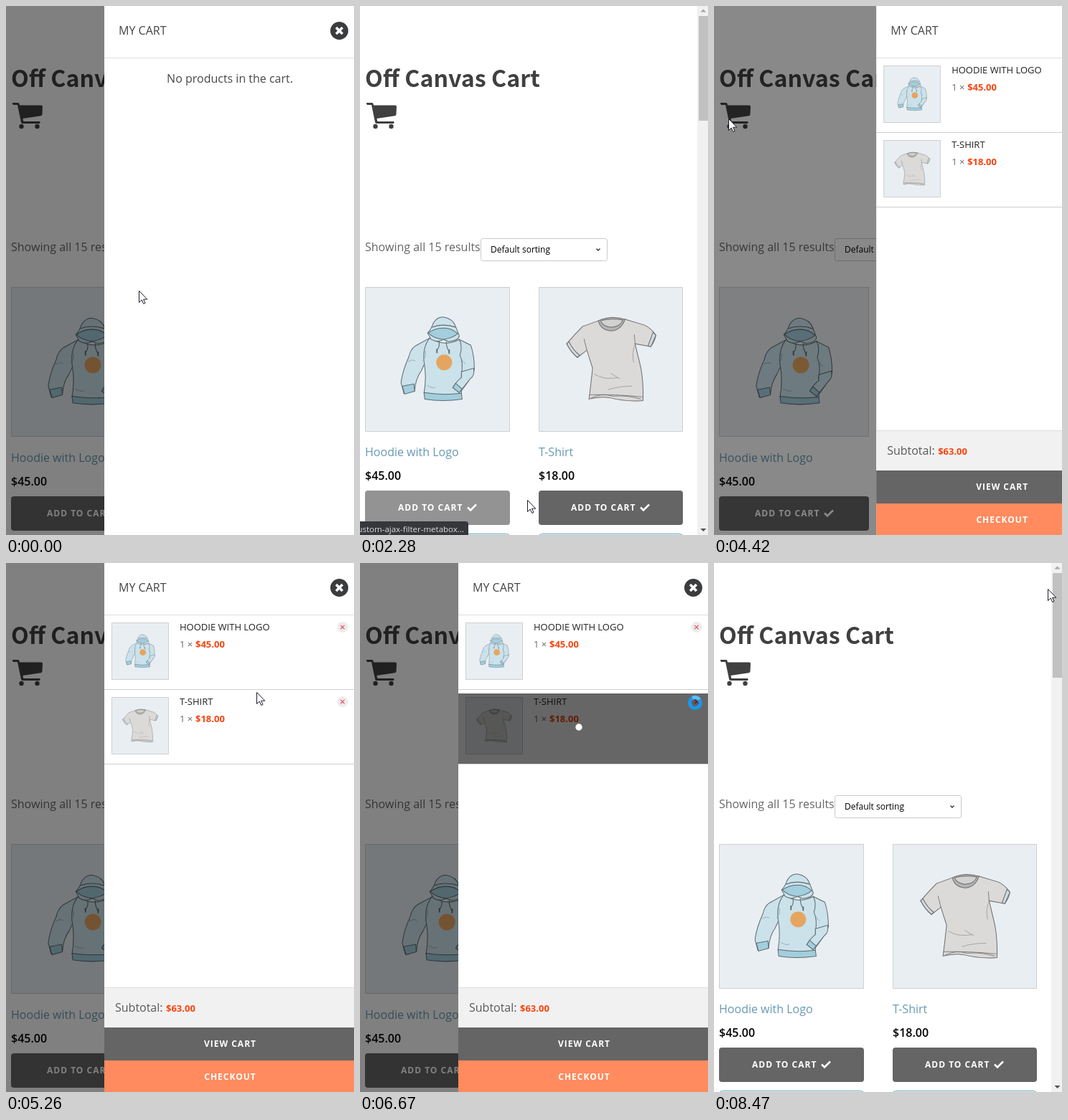
Recreate the animation shown at these times as an HTML page with a canvas. Size 485 by 738 pixels, loop 8520 ms.

```html
<!DOCTYPE html>
<html lang="en">
<head>
<meta charset="utf-8">
<title>Off Canvas Cart</title>
<style>
html, body { margin: 0; width: 100%; height: 100%; overflow: hidden; background: #fff; }
canvas { display: block; width: 485px; height: 738px; }
</style>
</head>
<body>
<canvas id="stage" width="485" height="738"></canvas>
<script>
const W = 485, H = 738, LOOP = 8520, PANEL = 348, BAR = 15, SLIDE = 450;
const ctx = document.getElementById('stage').getContext('2d');
const SANS = '"Open Sans", sans-serif';
const HEAD = '"Noto Sans CJK JP", "Noto Sans CJK SC", "Noto Sans CJK", "Open Sans", sans-serif';

// Pointer keys: time, x, y
const PATH = [
  [0, 185, 397], [50, 185, 397], [430, 82, 258], [690, 82, 258], [950, 84, 320],
  [1470, 96, 640], [1650, 108, 699], [2050, 112, 700], [2280, 232, 689], [2390, 330, 698],
  [2850, 330, 698], [3650, 65, 290], [3710, 65, 290], [4090, 20, 157], [4780, 20, 157],
  [5260, 349, 180], [5640, 467, 195], [7040, 467, 195], [7760, 468, 34], [7960, 468, 34],
  [8250, 465, 36], [LOOP, 465, 36]
];
const HAND = [[1560, 2240], [2310, 2960], [4040, 4260], [5600, 5690], [7710, 7960]];
const WAIT = [5690, 6730], STATUS = [1560, 3800];
const CLOSE1 = 650, OPEN = 4220, CLOSE2 = 7940;

const clamp = v => Math.max(0, Math.min(1, v));
const within = (t, [a, b]) => t >= a && t < b;
const ramp = (t, a, b) => clamp((t - a) / (b - a));
const pulse = (t, on, off) => Math.min(ramp(t, on, on + 120), 1 - ramp(t, off, off + 90));

// CSS "ease"
function ease(x) {
  x = clamp(x);
  let lo = 0, hi = 1, u = x;
  for (let i = 0; i < 20; i++) {
    u = (lo + hi) / 2;
    const bx = .75 * u * (1 - u) * (1 - u) + .75 * u * u * (1 - u) + u * u * u;
    if (bx < x) lo = u; else hi = u;
  }
  return .3 * u * (1 - u) * (1 - u) + 3 * u * u * (1 - u) + u * u * u;
}

// Monotone cubic through the pointer keys
function track(t, axis) {
  const slope = i => {
    const a = PATH[i], b = PATH[i + 1];
    return a && b ? (b[axis] - a[axis]) / (b[0] - a[0]) : 0;
  };
  const tangent = i => {
    const p = slope(i - 1), q = slope(i);
    return p * q > 0 ? 2 * p * q / (p + q) : 0;
  };
  let i = 0;
  while (i < PATH.length - 2 && PATH[i + 1][0] <= t) i++;
  const a = PATH[i], b = PATH[i + 1], d = b[0] - a[0], s = (t - a[0]) / d;
  const s2 = s * s, s3 = s2 * s;
  return (2 * s3 - 3 * s2 + 1) * a[axis] + (3 * s2 - 2 * s3) * b[axis] +
    d * ((s3 - 2 * s2 + s) * tangent(i) + (s3 - s2) * tangent(i + 1));
}

function box(x, y, w, h, fill) {
  ctx.fillStyle = fill;
  ctx.fillRect(x, y, w, h);
}
function round(x, y, w, h, r, fill, line) {
  ctx.beginPath();
  ctx.roundRect(x, y, w, h, r);
  if (fill) { ctx.fillStyle = fill; ctx.fill(); }
  if (line) { ctx.strokeStyle = line; ctx.lineWidth = 1; ctx.stroke(); }
}
function disc(x, y, r, fill) {
  ctx.beginPath();
  ctx.arc(x, y, r, 0, 7);
  ctx.fillStyle = fill;
  ctx.fill();
}
function shape(d, fill, line, width = 1) {
  const p = new Path2D(d);
  if (fill) { ctx.fillStyle = fill; ctx.fill(p); }
  if (line) { ctx.strokeStyle = line; ctx.lineWidth = width; ctx.stroke(p); }
}
function cross(x, y, r, color, width) {
  shape(`M${x - r} ${y - r}L${x + r} ${y + r}M${x + r} ${y - r}L${x - r} ${y + r}`, null, color, width);
}
function text(s, x, y, size, color, weight = 400, opt = {}) {
  ctx.font = `${weight} ${size}px ${opt.family || SANS}`;
  ctx.letterSpacing = (opt.space || 0) + 'px';
  ctx.textAlign = opt.align || 'left';
  ctx.fillStyle = color;
  ctx.fillText(s, x, y);
  ctx.letterSpacing = '0px';
}
function at(x, y, scale, draw) {
  ctx.save();
  ctx.translate(x, y);
  ctx.scale(scale, scale);
  draw();
  ctx.restore();
}

// Garments are drawn in a 201.5 px square
function hoodie() {
  const ink = '#5d6a70', cloth = '#cbe2eb', dark = '#a3cedd';
  shape('M90 71L70 82Q63 87 61 97Q52 117 50 133L54 148L69 145Q70 128 78 117L86 100Z', cloth, ink);
  shape('M52 138L68 135L69 145L55 149Z', dark, ink);
  shape('M131 73L147 81Q152 95 152 115Q148 127 131 148L122 140L133 121L131 100Z', cloth, ink);
  shape('M90 71Q80 83 82 104Q86 125 82 148Q108 152 134 149L134 121Q137 106 132 95Q136 82 131 73Q110 84 90 71Z', cloth, ink);
  shape('M82 147Q108 151 134 148L135 156Q108 160 83 156Z', dark, ink);
  shape('M134 118L151 113Q153 123 146 128L131 147L122 140Q128 130 134 126Z', cloth, ink);
  shape('M126 134L135 142L131 147L122 140Z', dark, ink);
  shape('M87 64Q92 59 95 50Q101 41 109 42Q122 44 126 55L131 68Q130 75 116 76L109 73Q101 78 92 73Z', cloth, ink);
  shape('M88 64Q97 57 109 57Q121 57 129 65Q122 71 109 73Q96 72 88 64Z', dark, ink);
  shape('M93 56Q108 50 126 56M103 76Q104 84 100 88M113 76Q113 84 117 90', null, ink, 1.1);
  shape('M100 86v6M117 87v6', null, ink, 1.8);
  shape('M80 103Q85 98 84 89M132 95Q134 103 140 107M60 104Q66 100 70 103M86 137Q95 142 98 139', null, '#87a2ad', .8);
  disc(110, 105, 11, '#e5a561');
}
function shirt() {
  const ink = '#6b6b6c', cloth = '#dbdad9';
  shape('M83 47L61 55Q50 66 39 79Q45 91 54 98L67 88L75 113Q73 132 70 156Q85 152 98 154Q122 160 145 158Q146 134 142 112L134 79L156 83Q162 74 163 67Q156 57 147 53L120 45Q101 42 83 47Z', cloth, ink);
  shape('M83 47Q86 60 101 61Q115 60 120 45Q101 39 83 47Z', '#b5b5b5', ink);
  shape('M86 47Q101 43 117 46Q114 55 101 56Q89 55 86 47Z', '#d2d2d0', ink);
  shape('M39 79Q45 91 54 98L57 95Q48 88 42 76ZM163 67L156 83L152 82L159 63Z', '#cfd9de', ink);
  shape('M67 88L63 72M134 79L133 66M71 150Q105 149 144 153M72 155Q88 147 103 152Q122 150 142 156', null, ink, .8);
  shape('M77 121Q91 130 111 126M100 120L113 128M96 143Q112 138 130 138M134 80Q129 92 132 105M64 76L67 87', null, '#999', .8);
}
function picture(x, y, w, h, draw) {
  round(x + .5, y + .5, w - 1, h - 1, 0, '#e9eef2', '#cdcfd0');
  at(x, y, h / 201.5, draw);
}

function card(x, col, name, price, art, load) {
  const dy = Math.round(col - 201.5);
  const left = Math.round(x), wide = Math.round(x + col) - left;
  picture(left, 392, wide, Math.round(col), art);
  text(name, left, 628 + dy, 16, '#6799b2');
  text(price, left, 661 + dy, 16, '#000', 600);
  const top = 676 + dy, label = Math.round(x + col / 2 - 55), tone = 101 + 46 * load;
  round(left, top, wide, 48, 4, `rgb(${tone},${tone},${tone})`);
  text('ADD TO CART', label, top + 28, 12, '#fff', 700, { space: 1 });
  shape(`M${label + 97} ${top + 23.5}l4 4 8-8`, null, '#fff', 2.6);
  round(left + .5, top + 60.5, wide - 1, 48, 4, '#fff', '#5f9fb4');
}

function page(t, view) {
  box(0, 0, W, H, '#fff');
  text('Off Canvas Cart', 7, 113, 32.2, '#404040', 700, { family: HEAD });
  shape('M9 135H17Q18.5 135 19 138.5H49Q51 138.5 51 140.5L50.5 151Q50.5 153 48.5 153.3L23.5 157L24.3 161H47Q48.5 162.5 47 164H23Q21.3 164 21 162L16 138H10Q8.5 136.5 9 135Z', '#404040');
  disc(21.5, 168, 3.2, '#404040');
  disc(43.5, 168, 3.2, '#404040');
  text('Showing all 15 results', 7, 342, 16, '#666');
  round(168.5, 324.5, 176, 31, 3, '#fff', '#c9c9c9');
  text('Default sorting', 182, 344, 12, '#000');
  shape('M329.5 338.5l2.5 2.5 2.5-2.5', null, '#333', 1.4);
  const col = (view - 67) / 2;
  card(7, col, 'Hoodie with Logo', '$45.00', hoodie, pulse(t, 1780, 2330));
  card(47 + col, col, 'T-Shirt', '$18.00', shirt, pulse(t, 2420, 2900));
}

function scrollbar() {
  box(W - BAR, 0, BAR, H, '#f1f1f1');
  box(W - 13, 14, 13, 146, '#c1c1c1');
  shape('M474.5 8.5l4-4 4 4z', '#a3a3a3');
  shape('M474.5 729l4 4 4-4z', '#505050');
}

function item(y, name, price, art) {
  picture(147, y + 11, 80, 80, art);
  text(name, 242, y + 22, 13, '#222');
  text('1 ×', 242, y + 46, 13, '#666');
  text(price, 264, y + 46, 13, '#f9440f', 700);
  disc(469, y + 17.5, 7.5, '#ececec');
  cross(469, y + 17.5, 2.7, '#f5455c', 1.2);
  box(137, y + 104, PANEL, 1, '#cfcfcf');
}

function panel(t, x, filled) {
  ctx.save();
  ctx.translate(x - 137, 0);
  box(137, 0, PANEL, H, '#fff');
  text('MY CART', 157, 40, 16, '#444');
  disc(464.5, 34.5, 12.5, '#3a3c3e');
  cross(464.5, 34.5, 4.4, '#fff', 3.6);
  box(137, 72, PANEL, 1, '#dedede');
  if (!filled) {
    text('No products in the cart.', 312, 107, 16, '#484848', 400, { align: 'center' });
  } else {
    const both = t < WAIT[1];
    item(72, 'HOODIE WITH LOGO', '$45.00', hoodie);
    if (both) item(176, 'T-SHIRT', '$18.00', shirt);
    if (within(t, WAIT)) {
      box(137, 182, PANEL, 98, `rgba(0,0,0,${.6 * ramp(t, 5690, 5890)})`);
      const a = 3.46 + (t - 6670) / 1000 * Math.PI * 2;
      disc(311 + 6.3 * Math.cos(a), 231 + 6.3 * Math.sin(a), 4.7, '#fff');
    }
    box(137, 592, PANEL, 56, '#f1f1f1');
    box(137, 592, PANEL, 1, '#dcdcdc');
    text('Subtotal:', 152, 626, 16, '#5a5a5a');
    text(both ? '$63.00' : '$45.00', 223, 626, 13, '#f9440f', 700);
    box(137, 648, PANEL, 46, '#656565');
    box(137, 694, PANEL, 44, '#ff8b5e');
    const label = { align: 'center', space: 1 };
    text('VIEW CART', 312.5, 675, 12, '#fff', 700, label);
    text('CHECKOUT', 312.5, 721, 12, '#fff', 700, label);
  }
  ctx.restore();
}

function status() {
  round(-2, 719, 153, 21, [0, 4, 0, 0], '#35373b');
  text('ustom-ajax-filter-metabox...', 145, 734, 11.5, '#dcdee0', 400, { align: 'right' });
}

function pointer(t) {
  ctx.save();
  ctx.translate(Math.round(track(t, 1)), Math.round(track(t, 2)));
  if (within(t, WAIT)) {
    const a = t / 1000 * Math.PI * 2;
    ctx.beginPath();
    ctx.arc(0, 0, 7.5, 0, 7);
    ctx.strokeStyle = '#1c96ee';
    ctx.lineWidth = 5;
    ctx.stroke();
    ctx.beginPath();
    ctx.arc(0, 0, 7.5, a, a + 1.4);
    ctx.strokeStyle = '#62bdf8';
    ctx.stroke();
  } else if (HAND.some(w => within(t, w))) {
    shape('M-1.5 1.5Q0-.5 1.5 1.5V8Q3 6.5 4.5 8.5Q6 7.5 7 9.5Q9.5 8.5 9.5 11.5V15Q9 18 7.5 21H-1.5Q-2 18-4.5 14.5Q-6 11-4 11L-1.5 13Z', '#fff', '#000');
  } else {
    shape('M.5.5V16.5L4.2 13L6.7 18.5L9 17.5L6.6 12.2H11.8Z', '#fff', '#1c1c28');
  }
  ctx.restore();
}

function frame(now) {
  const t = now % LOOP;
  const isOpen = t < CLOSE1 || within(t, [OPEN, CLOSE2]);
  const start = t < CLOSE1 ? -LOOP : t < OPEN ? CLOSE1 : t < CLOSE2 ? OPEN : CLOSE2;
  const move = ease((t - start) / SLIDE), fade = ease((t - start) / 300);
  const shown = isOpen ? move : 1 - move;
  const dim = isOpen ? fade : 1 - fade;
  const view = isOpen ? W : W - BAR;

  ctx.clearRect(0, 0, W, H);
  page(t, view);
  if (dim > 0) box(0, 0, view, H, `rgba(0,0,0,${dim / 2})`);
  if (shown > 0) panel(t, view - PANEL * shown, t >= OPEN);
  if (!isOpen) scrollbar();
  if (within(t, STATUS)) status();
  pointer(t);
}

const begin = performance.now();
function tick() {
  frame(performance.now() - begin);
  requestAnimationFrame(tick);
}
tick();
</script>
</body>
</html>
```
